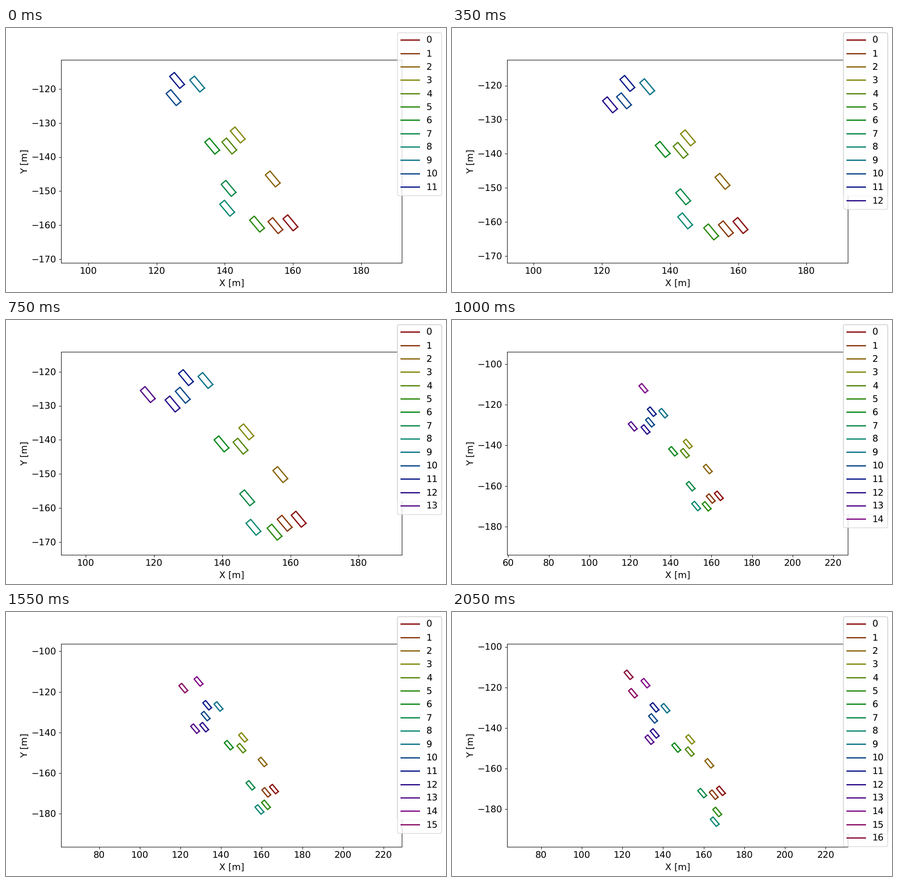
Recreate the animation shown at these times as a matplotlib script. Size 966 by 580 pixels, loop 2.1 s.

```python
import colorsys

import numpy as np
import matplotlib.pyplot as plt
from matplotlib.animation import FuncAnimation
from matplotlib.ticker import MultipleLocator

FRAMES, INTERVAL = 42, 50   # ms
SAMPLE = 40                 # ms between recorded positions
LAST = 51                   # last recorded position
LENGTH, WIDTH = 4.6, 1.8    # vehicle size in metres
LANE_0, LANE_STEP = 29.4, 3.95
COURSE, YAW = np.radians([-51.5, -50])

# per lane, label: (distance along the road, metres per sample)
LANES = [
    {2: (210.5, 0.274), 3: (194.0, 0.302), 9: (174.9, 0.292), 14: (166.3, 0.304)},
    {0: (223.8, 0.291), 4: (195.0, 0.372), 11: (170.4, 0.308), 16: (165.6, 0.31)},
    {1: (221.7, 0.318), 6: (191.9, 0.321), 10: (173.7, 0.318), 15: (168.0, 0.485)},
    {5: (218.0, 0.542), 7: (204.6, 0.572), 12: (174.5, 0.509)},
    {8: (208.9, 0.779), 13: (172.7, 0.75)},
]
ENTRY = {12: 8, 13: 18, 14: 25, 15: 38, 16: LAST}   # label: first sample
TOTAL = sum(map(len, LANES))


def axes_of(angle):
    c, s = np.cos(angle), np.sin(angle)
    return np.array([c, s]), np.array([-s, c])


ALONG, ACROSS = axes_of(COURSE)
FRONT, SIDE = axes_of(YAW)
CORNERS = np.array([p * FRONT * LENGTH / 2 + q * SIDE * WIDTH / 2
                    for p, q in [(1, 1), (1, -1), (-1, -1), (-1, 1), (1, 1)]])

plt.rcParams.update({"font.family": "DejaVu Sans", "font.size": 14.4,
                     "text.hinting": "none"})
fig, ax = plt.subplots(figsize=(9.66, 5.8), dpi=100)
fig.subplots_adjust(top=0.879)
ax.set_xlabel("X [m]")
ax.set_ylabel("Y [m]")
ax.xaxis.set_major_locator(MultipleLocator(20))

box = ax.get_position()
ASPECT = box.width * 966 / (box.height * 580)

lines = [
    ax.plot([], [], lw=2, label=str(i),
            color=colorsys.hls_to_rgb(i / TOTAL, 0.3, 0.8))[0]
    for i in range(TOTAL)
]
legends = []


def positions(k):
    """Centres of all vehicles on the road at sample k, by label."""
    found = {}
    for lane, cars in enumerate(LANES):
        for label, (start, speed) in cars.items():
            age = k - ENTRY.get(label, 0)
            if age >= 0:
                # traffic speeds up slightly
                dist = start + speed * age * (0.95 + 0.05 * age / LAST)
                found[label] = dist * ALONG + (LANE_0 - lane * LANE_STEP) * ACROSS
    return found


def stack_legends(k):
    # translucent legends pile up; only the top few remain visible
    while legends:
        legends.pop().remove()
    for j in range(max(k - 3, 0), k + 1):
        shown = len(positions(j))
        legends.append(fig.legend(handles=lines[:shown], loc="upper right"))


def update(n):
    k = n * INTERVAL // SAMPLE
    cars = positions(k)
    for label, line in enumerate(lines):
        if label in cars:
            line.set_data(*(cars[label] + CORNERS).T)
        else:
            line.set_data([], [])

    cx, cy = np.mean(list(cars.values()), axis=0)
    wide = len(cars) > 14
    half_y = 50 if wide else 50 / ASPECT
    half_x = half_y * ASPECT
    ax.set_xlim(cx - half_x, cx + half_x)
    ax.set_ylim(cy - half_y, cy + half_y)
    ax.yaxis.set_major_locator(MultipleLocator(20 if wide else 10))
    stack_legends(k)
    return lines


anim = FuncAnimation(fig, update, frames=FRAMES, interval=INTERVAL,
                     init_func=lambda: update(0), repeat=True,
                     repeat_delay=0, blit=False)
plt.show()
```
